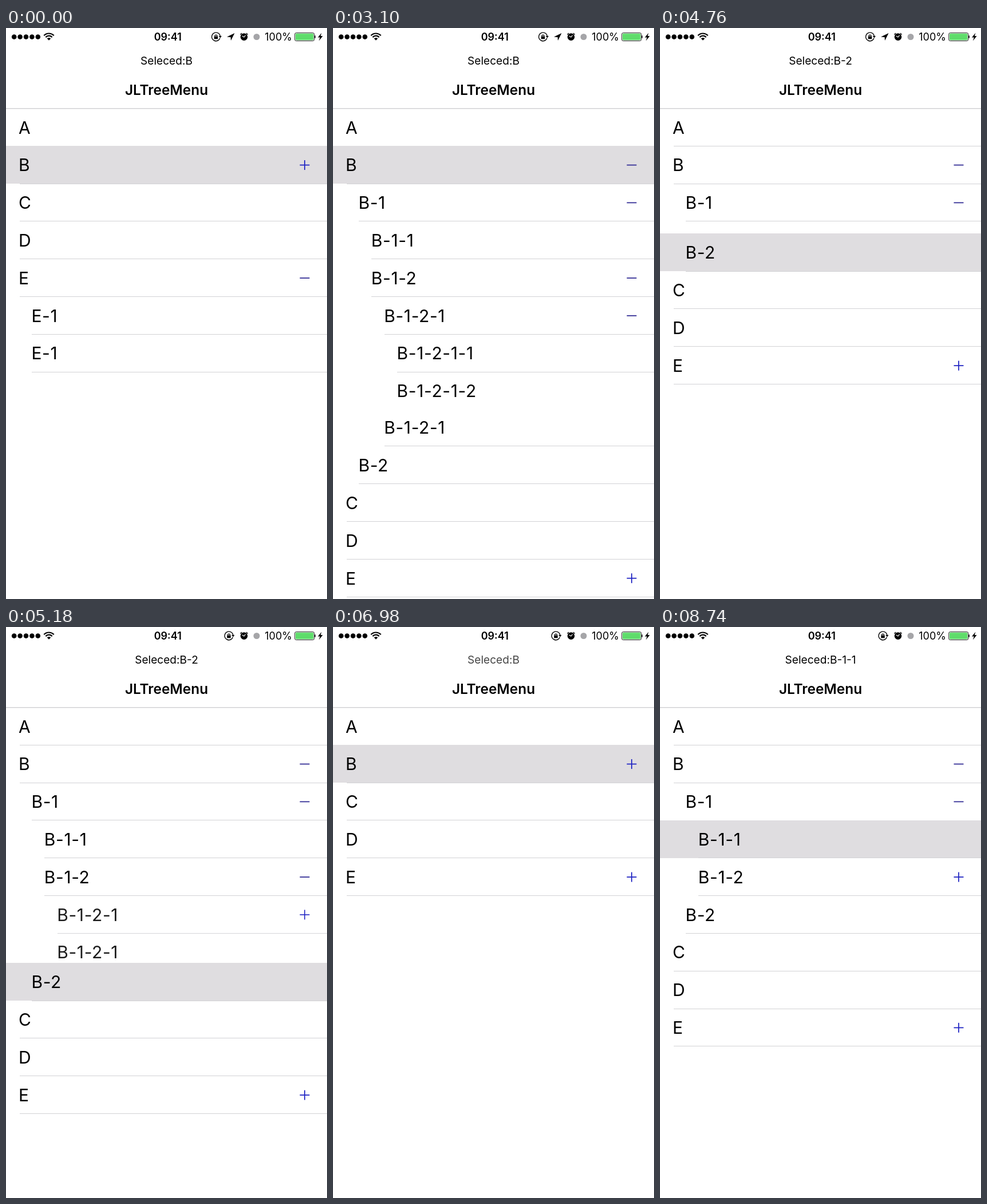
Write an HTML page with a canvas that moves like this. It is 561 px wide and 998 px high and loops after 8780 ms.

```html
<!DOCTYPE html>
<html lang="en">
<head>
<meta charset="utf-8">
<title>JLTreeMenu</title>
<style>
  html, body { margin: 0; width: 100%; height: 100%; overflow: hidden; background: #fff; }
  canvas { display: block; width: 561px; height: 998px; }
</style>
</head>
<body>
<canvas id="stage" width="561" height="998"></canvas>
<script>
const ctx = document.getElementById('stage').getContext('2d');
const W = 561, H = 998, LOOP = 8780;
const TOP = 140.8, ROW = 65.83, INDENT = 22.4;
const SLIDE = 150, LABEL_FADE = 180, ARROW_GONE = 5100;
const FONT = 'Inter, "Liberation Sans", sans-serif';

const item = (name, ...kids) => ({ name, kids });
const b121 = item('B-1-2-1', item('B-1-2-1-1'), item('B-1-2-1-2'));
const b12 = item('B-1-2', b121, item('B-1-2-1'));
const b11 = item('B-1-1');
const b1 = item('B-1', b11, b12);
const b2 = item('B-2');
const b = item('B', b1, b2);
const e = item('E', item('E-1'), item('E-1'));
const roots = [item('A'), b, item('C'), item('D'), e];

const toggle = (at, node) => ({ at, node, toggle: true });
const select = (at, node) => ({ at, node });
const events = [
  toggle(1365, e),
  toggle(1868, b), toggle(2232, b1), toggle(2596, b12), toggle(2964, b121),
  toggle(3445, b121), toggle(3735, b12), toggle(4025, b1),
  select(4300, b2),
  toggle(4719, b1), toggle(5065, b12), toggle(5410, b121),
  select(5900, null),
  toggle(5959, b),
  select(6850, b),
  toggle(7050, b), toggle(7430, b1),
  select(7850, b11)
];

function flatten(nodes, open, depth = 0) {
  return nodes.flatMap(node => [
    { node, depth },
    ...(open.has(node) ? flatten(node.kids, open, depth + 1) : [])
  ]);
}

function close(node, open) {
  open.delete(node);
  node.kids.forEach(kid => close(kid, open));
}

function stateAt(t) {
  const open = new Set([e]);
  const state = { open, selected: b, label: 'B', labelAt: -LABEL_FADE, slide: null };
  for (const ev of events) {
    if (ev.at > t) break;
    if (ev.toggle) {
      const opening = !open.has(ev.node);
      const before = new Set(open);
      if (opening) open.add(ev.node); else close(ev.node, open);
      state.slide = { node: ev.node, at: ev.at, opening, shown: opening ? new Set(open) : before };
    } else {
      state.selected = ev.node;
      if (ev.node) {
        state.label = ev.node.name;
        state.labelAt = ev.at;
      }
    }
  }
  if (state.slide && t - state.slide.at >= SLIDE) state.slide = null;
  return state;
}

// Cubic ease-in-out with control points at (.42, 0) and (.58, 1).
function easeInOut(x) {
  let lo = 0, hi = 1;
  for (let i = 0; i < 16; i++) {
    const s = (lo + hi) / 2, r = 1 - s;
    if (3 * r * r * s * 0.42 + 3 * r * s * s * 0.58 + s * s * s < x) lo = s; else hi = s;
  }
  return lo * lo * (3 - 2 * lo);
}

function text(str, x, y, size, { weight = 400, align = 'left', spacing = 0 } = {}) {
  ctx.font = `${weight} ${size}px ${FONT}`;
  ctx.letterSpacing = spacing + 'px';
  ctx.textAlign = align;
  ctx.fillStyle = '#000';
  ctx.fillText(str, x, y);
}

function rect(x, y, w, h, color) {
  ctx.fillStyle = color;
  ctx.fillRect(x, y, w, h);
}

function disc(x, y, r, color = '#000') {
  ctx.fillStyle = color;
  ctx.beginPath();
  ctx.arc(x, y, r, 0, 7);
  ctx.fill();
}

function polygon(points, color = '#000') {
  ctx.fillStyle = color;
  ctx.beginPath();
  points.forEach(([x, y]) => ctx.lineTo(x, y));
  ctx.fill();
}

function arc(x, y, r, from, to, width, color = '#000') {
  ctx.strokeStyle = color;
  ctx.lineWidth = width;
  ctx.beginPath();
  ctx.arc(x, y, r, from, to);
  ctx.stroke();
}

function roundBox(x, y, w, h, r) {
  ctx.beginPath();
  ctx.roundRect(x, y, w, h, r);
}

function drawLock(x) {
  arc(x, 15.3, 7.4, 0.35, 6.15, 1.4);
  polygon([[x + 4.8, 14], [x + 10, 14], [x + 7.4, 17.4]]);
  rect(x - 3.2, 14.4, 6.4, 4.9, '#000');
  arc(x, 14.2, 2, Math.PI, 0, 1.3);
}

function drawAlarm(x, y) {
  disc(x, y, 6.3);
  arc(x, y, 7.5, -2.6, -2.1, 1.4);
  arc(x, y, 7.5, -1.04, -0.54, 1.4);
  ctx.strokeStyle = '#fff';
  ctx.lineWidth = 1.2;
  ctx.beginPath();
  ctx.moveTo(x - 3.2, y - 1.5);
  ctx.lineTo(x, y + 0.4);
  ctx.lineTo(x + 2.5, y - 3);
  ctx.stroke();
}

function drawBattery() {
  ctx.strokeStyle = '#222';
  ctx.lineWidth = 1;
  roundBox(504.7, 8.5, 34, 14, 2.5);
  ctx.stroke();
  ctx.fillStyle = '#5fdc6b';
  roundBox(506, 9.8, 31.4, 11.4, 1.4);
  ctx.fill();
  ctx.fillStyle = '#222';
  roundBox(539.2, 13, 1.8, 5, 1);
  ctx.fill();
  polygon([[551.5, 8.5], [545, 16.5], [548.8, 16.5], [546.8, 22.5], [553.6, 14], [549.8, 14]]);
}

function drawStatusBar(hasArrow) {
  for (let i = 0; i < 5; i++) disc(14.2 + i * 10.4, 15.5, 4.3);
  for (const r of [7.8, 12]) arc(75, 21.5, r, -2.38, -0.76, 2.2);
  ctx.fillStyle = '#000';
  ctx.beginPath();
  ctx.moveTo(75, 21.8);
  ctx.arc(75, 21.5, 4.6, -2.38, -0.76);
  ctx.fill();
  text('09:41', 282.8, 22, 18, { weight: 600, align: 'center' });
  drawLock(hasArrow ? 367 : 389.5);
  if (hasArrow) polygon([[399.5, 9], [386, 15.6], [392.6, 16], [393, 22]]);
  drawAlarm(416, 15.6);
  disc(438, 15.5, 5.5, '#a5a5a8');
  text('100%', 500, 22, 18, { align: 'right' });
  drawBattery();
}

function drawHeader(t, state) {
  drawStatusBar(t < ARROW_GONE);
  ctx.globalAlpha = Math.min(1, (t - state.labelAt) / LABEL_FADE);
  text('Seleced:' + state.label, 280.5, 63.7, 19.1, { align: 'center' });
  ctx.globalAlpha = 1;
  text('JLTreeMenu', 280.5, 116.7, 24.4, { weight: 600, align: 'center' });
  rect(0, 140, W, 1, '#d0d0d2');
  rect(0, 141, W, 1, '#ececed');
}

function drawSign(y, isOpen) {
  const color = isOpen ? '#352f96' : '#2428c4';
  rect(513.5, y - 0.9, 17, 1.8, color);
  if (!isOpen) rect(521.1, y - 8.5, 1.8, 17, color);
}

function drawRows(rows, top, state) {
  const { selected, slide, open } = state;
  rows.forEach(({ node, depth }, i) => {
    const y = top + i * ROW, bottom = y + ROW, x = INDENT * (depth + 1);
    if (node === selected) {
      rect(0, Math.floor(y), W, Math.floor(bottom) - Math.floor(y), '#dfdde0');
    }
    const next = rows[i + 1];
    if (!next || next.node !== selected) {
      rect(Math.round(x + (depth ? 0 : 1.4)), Math.floor(bottom - 0.4), W, 1, '#d2d2d5');
    }
    text(node.name, x - 0.4, y + 43.7, 30, { spacing: 0.6 });
    if (node.kids.length) {
      const sliding = slide && slide.node !== node;
      drawSign(y + ROW / 2, (sliding ? slide.shown : open).has(node));
    }
  });
}

function drawTree(t, state) {
  const { slide, open } = state;
  const rows = flatten(roots, slide ? slide.shown : open);
  if (!slide) return drawRows(rows, TOP, state);

  const first = rows.findIndex(row => row.node === slide.node) + 1;
  const count = flatten(slide.node.kids, slide.shown).length;
  const p = easeInOut((t - slide.at) / SLIDE);
  const reveal = slide.opening ? p : 1 - p;
  const gapTop = TOP + first * ROW;
  const gap = count * ROW * reveal;

  // Rows below uncover the stationary child rows, which fade as they move.
  ctx.save();
  ctx.beginPath();
  ctx.rect(0, gapTop, W, gap);
  ctx.clip();
  ctx.globalAlpha = reveal;
  drawRows(rows.slice(first, first + count), gapTop, state);
  ctx.restore();
  drawRows(rows.slice(0, first), TOP, state);
  drawRows(rows.slice(first + count), gapTop + gap, state);
}

const start = performance.now();
function frame() {
  const t = (performance.now() - start) % LOOP;
  const state = stateAt(t);
  rect(0, 0, W, H, '#fff');
  drawTree(t, state);
  drawHeader(t, state);
  requestAnimationFrame(frame);
}
frame();
</script>
</body>
</html>
```
